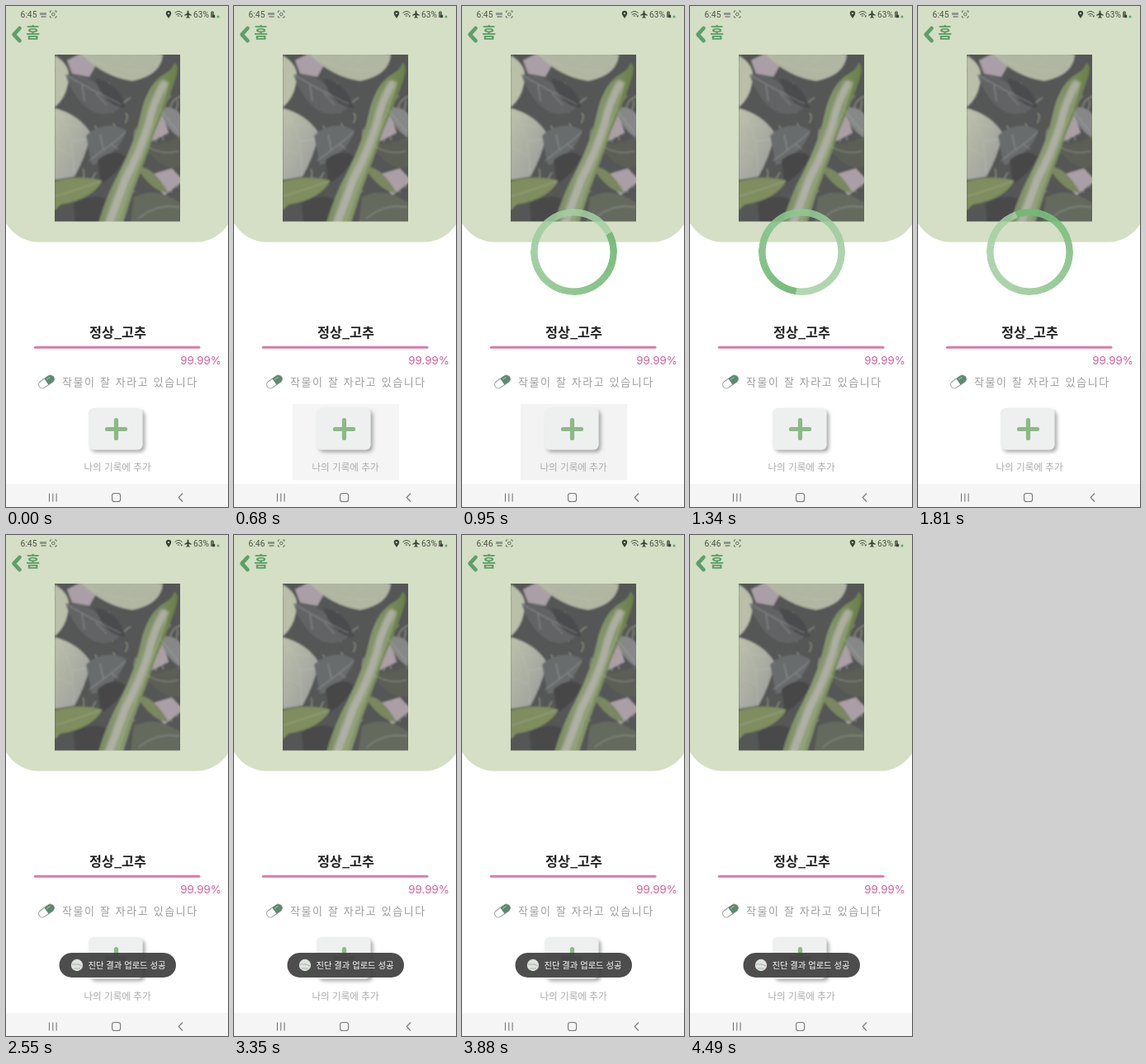
Animation of 269x608 px, one loop 4550 ms. Source, as an HTML page:

```html
<!DOCTYPE html>
<html lang="ko">
<head>
<meta charset="utf-8">
<title>작물 진단</title>
<style>
html, body { margin: 0; width: 100%; height: 100%; overflow: hidden; background: #fff; }
svg { position: absolute; left: 0; top: 0; width: 269px; height: 608px; }
text { font-family: "Noto Sans CJK KR", "Noto Sans CJK", "Noto Sans CJK JP", sans-serif; }
.status text { font-family: Roboto, sans-serif; font-size: 10.3px; fill: #4c5148; }
#score { font-family: Inter, sans-serif; font-size: 13.4px; }
#ring {
  position: absolute; left: 83px; top: 246px; width: 105px; height: 105px; border-radius: 50%;
  background: conic-gradient(rgba(112,184,115,.95), rgba(134,194,136,.9) 35%, rgba(158,205,158,.88) 65%, rgba(166,209,163,.85));
  -webkit-mask: radial-gradient(circle, transparent 43.5px, #000 44.3px);
  mask: radial-gradient(circle, transparent 43.5px, #000 44.3px);
}
</style>
</head>
<body>
<svg viewBox="0 0 269 608">
  <defs>
    <clipPath id="frame"><rect x="59" y="59" width="152" height="202.5"/></clipPath>
    <linearGradient id="pod" x1="0" x2="1" y1="0" y2=".35">
      <stop offset="0" stop-color="#5c7044"/>
      <stop offset=".5" stop-color="#8c9c74"/>
      <stop offset="1" stop-color="#62783f"/>
    </linearGradient>
    <linearGradient id="leaf" x1="0" y1="0" x2="1" y2="1">
      <stop offset="0" stop-color="#bcc2ab"/>
      <stop offset="1" stop-color="#99999a"/>
    </linearGradient>
    <filter id="shade" x="-20%" y="-20%" width="150%" height="150%">
      <feDropShadow dx="3" dy="3" stdDeviation="2" flood-color="#777" flood-opacity=".6"/>
    </filter>
    <filter id="soft"><feGaussianBlur stdDeviation=".8"/></filter>
    <filter id="blend"><feGaussianBlur stdDeviation="1.6"/></filter>
  </defs>

  <rect x="-6" y="-60" width="282" height="346.5" rx="46" fill="#d4dfc5"/>

  <g class="status">
    <text id="clock" x="17.600" y="13.600">6:45</text>
    <g fill="none" stroke="#62675d" stroke-width=".9">
      <path d="M53.500 8V6h2M59 6h2v2M61 12v2h-2M55.500 14h-2v-2"/>
      <circle cx="57.300" cy="10" r="1.800"/>
    </g>
    <path d="M41 8h8v3h-8zM42.500 12h6v2h-6z" fill="#92958f"/>
    <path d="M197 15c-2-3-3.200-4.200-3.200-6a3.200 3.200 0 0 1 6.400 0c0 1.800-1.200 3-3.200 6z" fill="#3e433b"/>
    <circle cx="197" cy="9" r="1.100" fill="#d4dfc5"/>
    <path d="M204.500 8.500q4.500-4 9 0M206 10.500q3-2.500 6 0M207.800 12.300q1.200-1 2.400 0" fill="none" stroke="#4c5148"/>
    <path d="M211.500 11.500h2.600l-1.300 2.600z" fill="#4c5148"/>
    <path d="M220.500 5.500q1 0 1 2v1.200l3.300 2v1.100l-3.300-.9v2l1.200 1v.8l-2.200-.5-2.200.5v-.8l1.200-1v-2l-3.300.9v-1.100l3.300-2V7.500q0-2 1-2z" fill="#3e433b"/>
    <text x="227" y="13.600">63%</text>
    <path d="M248 7h1.200V6h1.600v1h1.200v7h-4z" fill="#6a7065"/>
    <path d="M250 10.800h3.200v3.400h-3.200z" fill="#3d4239"/>
    <circle cx="257" cy="13" r="1.500" fill="#5aa869"/>
  </g>

  <path d="M16.500 27 9.500 34.600l7 7.500" fill="none" stroke="#5d9f69" stroke-width="4.600" stroke-linecap="round" stroke-linejoin="round"/>
  <text x="24.200" y="38.500" font-size="18.300" font-weight="700" fill="#5d9f69">홈</text>

  <g clip-path="url(#frame)">
    <g filter="url(#soft)">
      <rect x="55" y="55" width="160" height="212" fill="#555657"/>
      <path id="stems" fill="none" stroke="#8d927f" stroke-width="1.300"/>
      <path d="M166 135l23-9 8 28-20 10zM74 66l18-9 18 13-9 16-21-4zM171 206l30-9 14 15-23 18z" fill="#aa9fa6"/>
      <path d="M91 58Q119 46 190 59Q188 84 153 91Q118 86 91 58z" fill="#b1b6a2"/>
      <path d="M59 60Q81 73 75 94Q72 112 59 123z" fill="#b9bfa8"/>
      <path d="M72 83Q96 83 109 94L142 120Q126 136 107 129Q84 118 72 83z" fill="#626465"/>
      <path d="M108 88Q138 94 145 124Q119 122 108 88z" fill="#4a4b4d"/>
      <path d="M59 124Q89 132 103 155Q96 184 83 207L59 211z" fill="url(#leaf)"/>
      <path d="M97 157Q120 137 146 151Q137 179 104 193z" fill="#696c6d"/>
      <path d="M111 187Q131 171 145 183Q137 202 115 216z" fill="#464747"/>
      <path d="M186 124Q207 119 214 137L211 160Q193 149 186 124z" fill="#858886"/>
      <path d="M163 166Q186 171 209 159L214 195Q189 203 163 166z" fill="#5b5e57"/>
      <path d="M59 213Q88 204 117 212Q104 235 66 241L59 248z" fill="#7f8d5e"/>
      <path d="M82 239Q108 225 126 237L120 264H84z" fill="#48494a"/>
      <path d="M155 232Q182 218 211 239V263H151z" fill="#656a5e"/>
      <path d="M158 196Q177 192 197 227Q178 226 158 196z" fill="#7a8760"/>
      <path d="M204 69Q211 72 205 90Q193 124 181 151Q170 184 154 225L142 263H112Q121 231 137 202Q157 164 165 124Q174 92 193 82Q202 77 204 69z" fill="url(#pod)"/>
      <path d="M191 95Q178 119 173 143Q162 178 145 210L125 263" fill="none" stroke="#b5b5ae" stroke-width="10" stroke-linecap="round" opacity=".85" filter="url(#blend)"/>
      <path d="M197 92Q188 124 177 150Q164 187 148 225L135 262" fill="none" stroke="#9aa97f" stroke-width="2.500" opacity=".7"/>
      <path d="M94 59Q127 81 171 78M127 70l9-9M140 75l17-13M150 77l8 8M73 84Q103 102 139 119M92 96l3 19M109 106l13 14M60 128Q83 150 82 203M72 144l20 3M80 164l18-2M80 181l-18-8M100 188Q126 170 145 153M118 174l-4-18M128 168l8 6M187 126l22 27M170 170q20 12 39 6M60 231q28-9 54-18M160 258q22-19 50-14" fill="none" stroke="#c1c5b9" stroke-width=".8" opacity=".6"/>
    </g>
  </g>

  <text x="135.500" y="402" font-size="16.300" font-weight="700" text-anchor="middle" fill="#222">정상_고추</text>
  <path d="M35.300 414.300H234" stroke="#dc79ac" stroke-width="3" stroke-linecap="round"/>
  <text id="score" x="261" y="435" text-anchor="end" fill="#d0629c">99.99%</text>

  <g transform="translate(49 456) rotate(-35)">
    <rect x="-10.500" y="-4.500" width="21" height="9" rx="4.500" fill="#fff" stroke="#929a95"/>
    <path d="M0-4.500h6a4.500 4.500 0 0 1 0 9H0z" fill="#5a8b6d"/>
    <path d="M2-2h4.500" stroke="#a7c3b2" stroke-linecap="round"/>
  </g>
  <text x="68" y="461" font-size="13" font-weight="500" letter-spacing="1.600" fill="#9c9c9c">작물이 잘 자라고 있습니다</text>

  <rect id="press" x="71" y="483" width="129" height="92.500" fill="#f3f3f3"/>
  <rect x="100" y="488" width="65.500" height="50.500" rx="6" fill="#edf0ef" filter="url(#shade)"/>
  <path d="M133.500 502.500v22M122.500 513.500h22" stroke="#8cb985" stroke-width="5.200" stroke-linecap="round"/>
  <text x="135" y="563.500" font-size="11.600" text-anchor="middle" fill="#aaa">나의 기록에 추가</text>

  <g id="toast">
    <rect x="64.500" y="507" width="141.500" height="30" rx="15" fill="#404040" opacity=".93"/>
    <circle cx="86" cy="522" r="7.200" fill="#dfe2df"/>
    <path d="M80 521h7l5 2M82 526h8" fill="none" stroke="#a9b3aa" stroke-width="1.200"/>
    <text x="99.500" y="525.800" font-size="10.300" fill="#fff">진단 결과 업로드 성공</text>
  </g>

  <rect y="580" width="269" height="28" fill="#f5f5f5"/>
  <g fill="none" stroke="#777" stroke-width="1.100">
    <path d="M52.500 591.500v10M56.800 591.500v10M61.100 591.500v10"/>
    <rect x="128.600" y="591.500" width="10" height="10" rx="2.800"/>
    <path d="M214 591.500l-4.800 5 4.800 5"/>
  </g>
</svg>
<div id="ring"></div>
<script>
const LOOP = 4550;
const byId = id => document.getElementById(id);
const ramp = (t, from, to) => Math.min(1, Math.max(0, (t - from) / (to - from)));
const clock = byId("clock"), press = byId("press"), toast = byId("toast"), ring = byId("ring");

// Thin shoots scattered behind the leaves.
let seed = 11;
const rand = () => (seed = seed * 16807 % 2147483647) / 2147483647;
let shoots = "";
for (let i = 0; i < 30; i++) {
  const x = 62 + rand() * 146, y = 75 + rand() * 182;
  shoots += `M${x} ${y}q${rand() * 14 - 7} ${-4 - rand() * 9} ${rand() * 28 - 14} ${-8 - rand() * 14}`;
}
byId("stems").setAttribute("d", shoots);

function draw(t) {
  clock.textContent = t < 3350 ? "6:45" : "6:46";
  press.setAttribute("opacity", ramp(t, 590, 700) * (1 - ramp(t, 960, 1080)));
  ring.style.visibility = t >= 810 && t < 2070 ? "visible" : "hidden";
  ring.style.transform = `rotate(${62 + (t - 950) * 0.323}deg)`;
  toast.setAttribute("opacity", ramp(t, 2030, 2310));
}

const start = performance.now();
function tick() {
  draw((performance.now() - start) % LOOP);
  requestAnimationFrame(tick);
}
draw(0);
tick();
</script>
</body>
</html>
```
